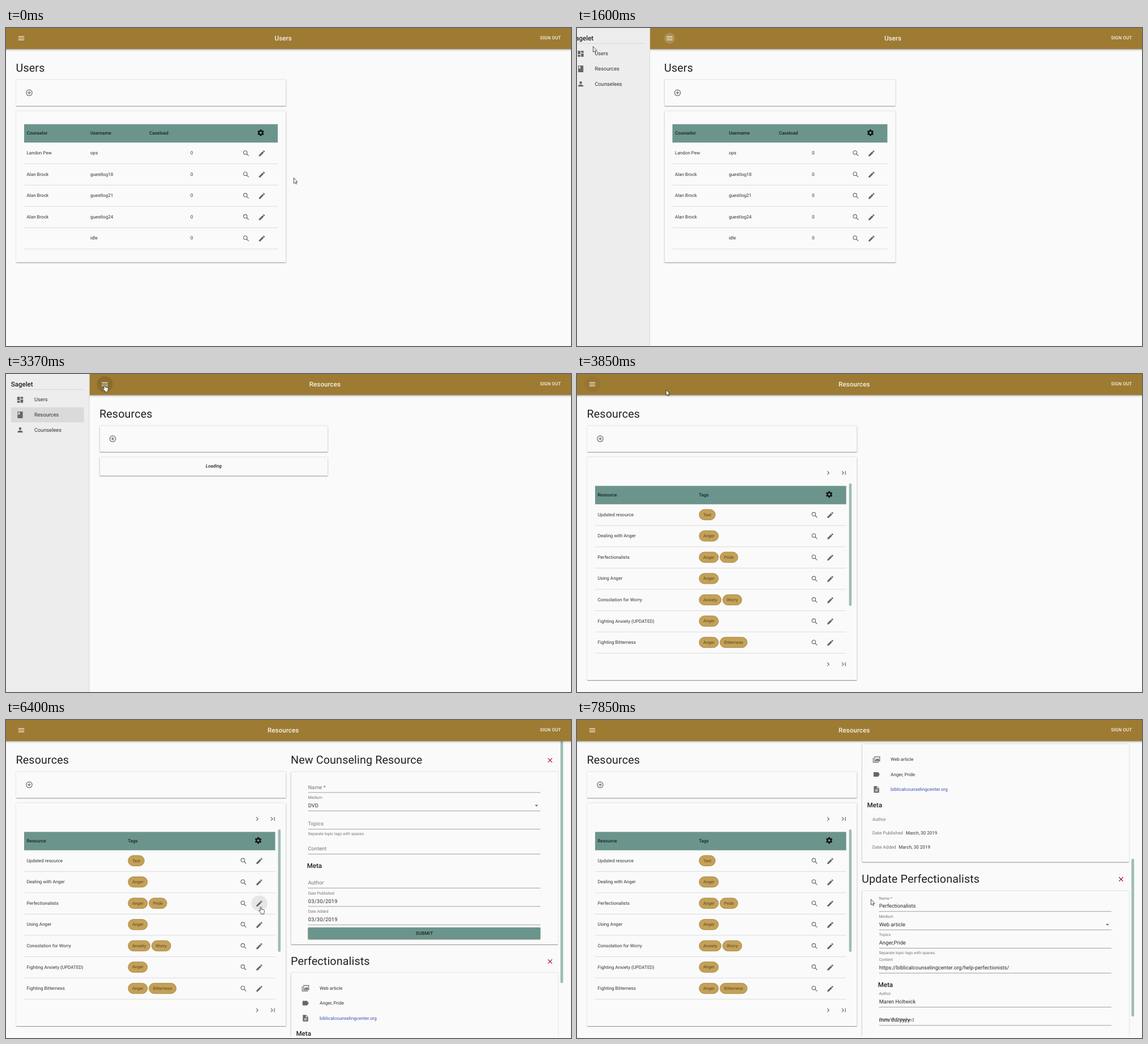
Recreate the animation shown at these times as an HTML page. Size 998 by 561 pixels, loop 8 s.

```html
<!DOCTYPE html>
<html lang="en">
<head>
<meta charset="utf-8">
<title>Counseling resources</title>
<style>
html, body { margin: 0; width: 100%; height: 100%; overflow: hidden; background: #fafafa; }
#stage { display: block; width: 998px; height: 561px; font-family: Roboto, Arial, sans-serif; text-rendering: geometricPrecision; }
.card { fill: #fafafa; filter: drop-shadow(0 1px .4px rgba(0,0,0,.34)) drop-shadow(0 .3px .8px rgba(0,0,0,.2)); }
.bar { fill: #9e7b33; filter: drop-shadow(0 1.4px 1.3px rgba(0,0,0,.32)) drop-shadow(0 1px 2px rgba(0,0,0,.15)); }
</style>
</head>
<body>
<svg id="stage" viewBox="0 0 998 561"></svg>
<script>
// The screen refreshes once per beat; all timing below is in beats.
const LOOP = 8000, BEAT = 133.2, LAST = 59;
const OPEN = 147.5, SCROLL = 403.5;
const TEAL = '#6b958c', THUMB = '#a0bdb5', GRAY = '#757575', INK = '#212121', CREAM = '#f6f2ea', RED = '#b00020';
const MEDIUM = 'font-weight="500" ', MIDDLE = 'text-anchor="middle" ';

const clamp = u => Math.min(1, Math.max(0, u));
const out = u => 1 - (1 - u) ** 2;
const smooth = u => u * u * (3 - 2 * u);
const between = (n, a, b) => n >= a && n < b;

// Pointer moves: first and last beat, destination, easing, hand shown at rest
const moves = [
  [0, 0, 508, 264, out],
  [1, 3, 254, 231, out],
  [3, 9, 23, 17, out, true],
  [11, 17, 40, 67, out, true],
  [18, 23, 170, 18, smooth, true],
  [27, 32, 45, 110, smooth, true],
  [35, 43, 415, 322, out, true],
  [45, 46, 446, 329, out, true],
  [51, 53, 519, 316, out]
];

// path, optional line width
const icons = {
  menu: ['M3 7h18M3 12h18M3 17h18', 2],
  add: ['M3 12a9 9 0 1 0 18 0a9 9 0 1 0-18 0M12 7v10M7 12h10', 2],
  search: ['M4 9.5a5.5 5.5 0 1 0 11 0a5.5 5.5 0 1 0-11 0M13.6 13.6l6.1 6.1', 2],
  edit: ['M3 21v-3.8L14 6.2l3.8 3.8-11 11zM15 5.2l2.6-2.6 3.8 3.8L18.8 9z'],
  close: ['M5.7 5.7l12.6 12.6M18.3 5.7L5.7 18.3', 2],
  next: ['M9.3 6.7l5.3 5.3-5.3 5.3', 2],
  last: ['M6.3 6.7l5.3 5.3-5.3 5.3M17 6v12', 2],
  drop: ['M7 10l5 5 5-5z'],
  board: ['M3 3h8v10H3zM3 15h8v6H3zM13 3h8v6h-8zM13 11h8v10h-8z'],
  book: ['M4 2h16v20H4zM6 4v8l2.5-1.5L11 12V4z'],
  person: ['M8 8a4 4 0 1 0 8 0a4 4 0 1 0-8 0M12 14q-8 .5-8 4v2h16v-2q0-3.500-8-4z'],
  photos: ['M6.500 4H22v13H6.500zM2 7v14h17M10 14l2.500-3 2 2 2.500-3 2.500 4z', 2],
  label: ['M3 5h14l5 7-5 7H3z'],
  file: ['M4 2h10l6 6v14H4zM8 12v2h8v-2zM8 16v2h8v-2zM13 3.500V9h5.500z']
};

const users = [['Landon Pew', 'ops'], ['Alan Brock', 'guestlog18'], ['Alan Brock', 'guestlog21'],
  ['Alan Brock', 'guestlog24'], ['', 'idle']];
const resources = [['Updated resource', 'Text'], ['Dealing with Anger', 'Anger'], ['Perfectionalists', 'Anger', 'Pride'],
  ['Using Anger', 'Anger'], ['Consolation for Worry', 'Anxiety', 'Worry'], ['Fighting Anxiety (UPDATED)', 'Anger'],
  ['Fighting Bitterness', 'Anger', 'Bitterness']];

const stage = document.getElementById('stage');
const ruler = document.createElement('canvas').getContext('2d');

// y is roughly the middle of the capitals
const text = (x, y, s, size = 8.09, fill = '#333', more = '') =>
  `<text x="${x}" y="${y + size * .325}" font-size="${size}" fill="${fill}" ${more}>${s}</text>`;
const rect = (x, y, w, h, fill, more = '') =>
  `<rect x="${x}" y="${y}" width="${w}" height="${h}" fill="${fill}" ${more}/>`;
const card = (x, y, w, h, more = '') => rect(x, y, w, h, '', `class="card" rx="1" ${more}`);
const disc = (x, y, r, fill, alpha) => `<circle cx="${x}" cy="${y}" r="${r}" fill="${fill}" opacity="${alpha}"/>`;
const heading = (x, y, s) => text(x - .5, y, s, 19.7, INK, 'letter-spacing=".15"');
const subhead = (x, y, s) => text(x, y, s, 11.56, INK, MEDIUM);

function icon(name, x, y, color = '#666') {
  const [d, w] = icons[name];
  const paint = w ? `fill="none" stroke="${color}" stroke-width="${w}"` : `fill="${color}" fill-rule="evenodd"`;
  return `<path transform="translate(${x} ${y}) scale(.578) translate(-12 -12)" d="${d}" ${paint}/>`;
}

function gear(x, y) {
  const teeth = [0, 60, 120].map(a => `<path d="M0-10V-6M0 6V10" stroke-width="5" transform="rotate(${a})"/>`);
  return `<g transform="translate(${x} ${y}) scale(.578)" fill="none" stroke="#111">
    <circle r="5.6" stroke-width="4"/>${teeth.join('')}</g>`;
}

function tableHead(x, y, w, cells) {
  return rect(x, y, w, 32.4, TEAL) + gear(x + w - 30, y + 15.1) +
    cells.map(([dx, s]) => text(x + dx, y + 15.6, s, 8.09, '#1b2220', MEDIUM)).join('');
}

const tableRow = (x, y, w) => rect(x, y + 18.6, w, 1, '#dcdcdc') +
  icon('search', x + w - 55.8, y + .6) + icon('edit', x + w - 28, y + .6);

function userTable(left, width) {
  const x = left + 14, w = width - 28.5, k = w - 448;
  const name = 117 + k * .255, load = 221 + k * .482, count = 296 + k * .693;
  return card(left, 146.5, width, 267) +
    tableHead(x, 169.7, w, [[4.5, 'Counselor'], [name, 'Username'], [load, 'Caseload']]) +
    users.map(([who, login], i) => {
      const y = 220.5 + i * 37.57;
      return tableRow(x, y, w) + text(x + 4.5, y, who) + text(x + name, y, login) +
        text(x + count, y, '0', 8.09, '#333', MIDDLE);
    }).join('');
}

function chips(x, y, tags) {
  ruler.font = '75.1px Roboto, Arial, sans-serif';
  return tags.map(tag => {
    const w = ruler.measureText(tag).width / 10 + 15, left = x;
    x += w + 2;
    return rect(left + .4, y - 9.2, w - .8, 18.4, '#c4a158', 'rx="9.2" stroke="#9e7b33" stroke-width=".8"') +
      text(left + w / 2, y, tag, 7.51, '#5a4721', MIDDLE);
  }).join('');
}

function resourceTable(n) {
  const pager = y => icon('next', 443.7, y) + icon('last', 471.2, y);
  const lens = between(n, 42, 46) ? .08 : 0, pen = between(n, 46, 53) ? .08 : 0;
  return card(18, 146.5, 476.5, 393.5) + pager(174.5) + pager(512) +
    rect(480.5, 193, 4.6, 216, THUMB, 'rx="2"') +
    tableHead(32, 197.4, 443.5, [[4.5, 'Resource'], [183.3, 'Tags']]) +
    disc(419.7, 323.4, 14, '#000', lens) + disc(447.5, 323.4, 14, '#000', pen) +
    resources.map(([title, ...tags], i) => {
      const y = 248.2 + i * 37.55;
      return tableRow(32, y, 443.5) + text(36.5, y, title) + chips(215.4, y, tags);
    }).join('');
}

// A filled field has a small label above its value, an empty one shows the label in its place.
function field(y, label, value) {
  const isDate = label.startsWith('Date'), shown = value || (isDate && 'mm/dd/yyyy');
  return text(533.5, value ? y : y + 14, label, value ? 6.94 : 9.25, GRAY) +
    (shown ? text(533.8, y + 14, shown, 9.25, '#2b2b2b', isDate ? 'letter-spacing=".28"' : '') : '') +
    rect(533.5, y + 23, 410.5, .8, '#8a8a8a');
}

function form(y, title, values) {
  const labels = ['Name *', 'Medium', 'Topics', 'Content', 'Author', 'Date Published', 'Date Added'];
  const fields = labels.map((label, i) =>
    field(y + 13 + i * 32.4 + (i > 2 ? 11.5 : 0) + (i > 3 ? 27.5 : 0), label, values[label]));
  return heading(503.5, y - 20.5, title) + icon('close', 961, y - 20.5, RED) +
    card(503.5, y, 471.5, 304.5) + fields.join('') + icon('drop', 937, y + 59.5) +
    text(533.5, y + 109.5, 'Separate topic tags with spaces.', 6.94, GRAY) + subhead(531.7, y + 166, 'Meta') +
    card(533.5, y + 274.5, 410.5, 20.5, `style="fill:${TEAL}"`) +
    text(739, y + 284.6, 'SUBMIT', 8.09, '#1b2220', MEDIUM + MIDDLE + 'letter-spacing=".2"');
}

function details() {
  const row = (i, name, s, fill) => icon(name, 529, 473 + i * 26.5) + text(554, 473 + i * 26.5, s, 8.09, fill);
  const meta = (i, label, x, s) => text(521.7, 579 + i * 24.3, label, 8.09, GRAY) + text(x, 579 + i * 24.3, s);
  return heading(503.5, 426, 'Perfectionalists') + icon('close', 961, 426, RED) + card(503.5, 446, 471.5, 208) +
    row(0, 'photos', 'Web article') + row(1, 'label', 'Anger, Pride') +
    row(2, 'file', 'biblicalcounselingcenter.org', '#3f51b5') + subhead(512.5, 553.5, 'Meta') +
    meta(0, 'Author', 580, '') + meta(1, 'Date Published', 580.7, 'March, 30 2019') +
    meta(2, 'Date Added', 568.3, 'March, 30 2019');
}

function sidePanels(n) {
  if (n < 35) return '';
  const scroll = SCROLL * smooth(clamp((n - 55.8) / 3.2));
  const viewing = n >= 44, editing = n >= 52;
  let body = form(91.5, 'New Counseling Resource',
    { Medium: 'DVD', 'Date Published': '03/30/2019', 'Date Added': '03/30/2019' });
  if (viewing) body += details();
  if (editing) body += form(704.9, 'Update Perfectionalists', {
    'Name *': 'Perfectionalists', Medium: 'Web article', Topics: 'Anger,Pride', Author: 'Maren Holtwick',
    Content: 'https://biblicalcounselingcenter.org/help-perfectionists/'
  });
  const thumb = viewing ? rect(979.3, 37 + scroll * .5155, 4.8, editing ? 278 : 427, THUMB, 'rx="2"') : '';
  return `<svg x="495" y="36" width="503" height="522" viewBox="495 ${36 + scroll} 503 522">${body}</svg>` + thumb;
}

function page(n, m) {
  const left = 18 + m, width = 476.5 - m / 2, onUsers = n < 17;
  let s = heading(left, 71, onUsers ? 'Users' : 'Resources') + card(left, 91.5, width, 46);
  if (between(n, 35, 38)) s += disc(41, 114.3, n < 36 ? 9 : 14, '#000', .08);
  s += icon('add', 41 + m, 114.3);
  if (onUsers) s += userTable(left, width);
  else if (n >= 28) s += resourceTable(n);
  else s += card(left, 147, width, 32.5) +
    text(left + width / 2, 162.3, 'Loading', 8.09, INK, MEDIUM + MIDDLE + 'font-style="italic"');
  return s + sidePanels(n);
}

function appBar(n, m) {
  const x = 27 + m;
  let s = rect(-10, -10, 1018, 47, '', 'class="bar"');
  if (between(n, 11, 14)) s += disc(x, 18, 5 + (n - 11) * 4.7, '#fff', .15);
  if (between(n, 24, 30)) s += disc(x, 18, 14, '#000', n < 28 ? .12 : .04);
  return s + icon('menu', x, 18, CREAM) +
    text(489.7 + m / 2, 18, n < 17 ? 'Users' : 'Resources', 11.56, CREAM, MEDIUM + MIDDLE + 'letter-spacing=".09"') +
    text(943.2, 17.6, 'SIGN OUT', 8.09, CREAM, MEDIUM + 'letter-spacing=".12"');
}

function drawer(n, shown) {
  if (shown <= 0) return '';
  const row = (y, fill) => rect(9, y, 128.5, 26.5, fill);
  const items = [['board', 'Users'], ['book', 'Resources'], ['person', 'Counselees']];
  let s = rect(0, 0, OPEN, 561, '#ededed') + rect(OPEN - 1, 0, 1, 561, '#dadada') +
    subhead(8.7, 18, 'Sagelet') + rect(9, 26.8, 128.5, .8, '#d0d0d0');
  if (n === 15) s += row(32.3, '#d6d6d6');
  if (n >= 16) s += row(58.8, n < 19 ? '#d6d6d6' : '#dadada');
  if (between(n, 17, 22)) {
    const ripple = disc(34, 8.5, 24 + (n - 17) * 34, '#aeb2de', clamp((22 - n) / 3));
    s += `<svg x="9" y="58.8" width="128.5" height="26.5">${ripple}</svg>`;
  }
  s += items.map(([name, label], i) =>
    icon(name, 25, 45.5 + i * 26.6) + text(50, 45.4 + i * 26.6, label, 9.25)).join('');
  return `<g transform="translate(${shown - OPEN})">${s}</g>`;
}

function statusBar(n) {
  if (!between(n, 15, 23)) return '';
  const link = n < 16 ? 'user' : 'resource';
  return rect(-4, 550.6, 335, 14, '#2f3436', 'rx="2"') + (n >= 21 ? '' :
    text(1, 557, 'localhost:3000/' + link, 6.5, '#b4b7b8', 'font-family="Noto Sans, Open Sans, sans-serif"'));
}

function cursor(n) {
  const i = moves.findLastIndex(([start]) => start <= n);
  const [start, end, x, y, ease, hand] = moves[i];
  const [, , x0, y0] = moves[Math.max(0, i - 1)];
  const u = n >= end ? 1 : ease((n - start) / (end - start));
  const d = hand && n >= end
    ? 'M3.2 1.4q.9-1.5 2 0V5l4.3 1q1.3.4 1 2.2L9.8 11.4V13.4H4.6V11.8L.6 7.8q.2-1.6 1.6-.8l1 .9z'
    : 'M.3.4V10.2l2.2-2 1.5 3.2 1.5-.7L4.1 7.6H7z';
  return `<path transform="translate(${x0 + (x - x0) * u} ${y0 + (y - y0) * u})" d="${d}"
    fill="#fff" stroke="#222" stroke-width=".8"/>`;
}

function draw(n) {
  const closing = n >= 26;
  const rest = closing ? clamp((n - 26.5) / 1.5) ** 2 : 1 - clamp((n - 11.2) / 1.6); // 1 = closed
  const margin = OPEN * (1 - rest ** (closing ? 1 : 3.75));
  const shown = OPEN * (1 - rest ** (closing ? 1 : 3));
  stage.innerHTML = rect(0, 0, 998, 561, '#fafafa') + page(n, margin) + appBar(n, margin) +
    drawer(n, shown) + statusBar(n) + cursor(n);
}

let drawn = -1;
function loop(now) {
  const n = Math.min(LAST, Math.floor((now % LOOP + 10) / BEAT));
  if (n !== drawn) draw(drawn = n);
  requestAnimationFrame(loop);
}
loop(0);
</script>
</body>
</html>
```
